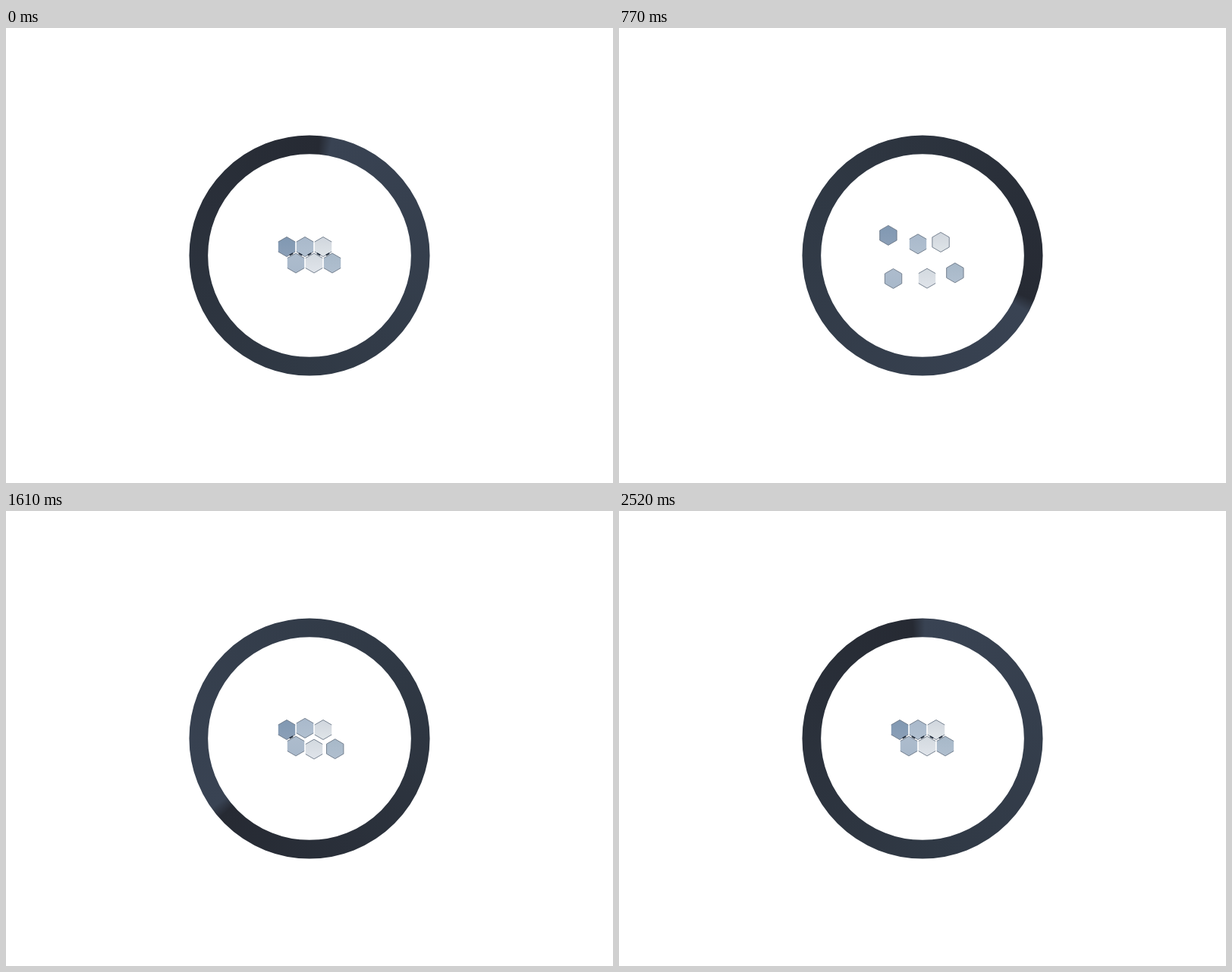
Recreate the animation shown at these times as an HTML page with a canvas. Size 800 px wide and 600 px high, loop 2590 ms.

```html
<!DOCTYPE html>
<html>
<head>
<meta charset="utf-8">
<style>
  html, body { margin: 0; width: 100%; height: 100%; overflow: hidden; background: #fff; }
  canvas { display: block; }
</style>
</head>
<body>
<canvas id="stage" width="800" height="600"></canvas>
<script>
const ctx = document.getElementById('stage').getContext('2d');
const LOOP = 2590, STEP = 70;
const HALF_W = 11.2, RADIUS = 13;

// Rest position, outward direction, travel, delay, top and bottom colour
const hexes = [
  { x: 370, y: 288.5, dx: -1, dy: -1, travel: 25, delay: 565, top: '#8098b2', bottom: '#8b9fb7' },
  { x: 394, y: 288.5, dx: 0, dy: -1, travel: 37, delay: 700, top: '#a9b9cb', bottom: '#b1c0d0' },
  { x: 418, y: 288.5, dx: 1, dy: -1, travel: 19.5, delay: 0, top: '#d0d6dd', bottom: '#dfe4e8' },
  { x: 382, y: 310, dx: -1, dy: 1, travel: 20.5, delay: 420, top: '#adbccd', bottom: '#a8b8ca' },
  { x: 406, y: 310, dx: 0, dy: 1, travel: 22, delay: 280, top: '#d3d9df', bottom: '#e0e4ea' },
  { x: 430, y: 310, dx: 1, dy: 1, travel: 20, delay: 140, top: '#a7b8c8', bottom: '#b0bfcf' }
];

function ease(from, to, t) {
  const x = Math.min(1, Math.max(0, (t - from) / (to - from)));
  return x * x * (3 - 2 * x);
}

// One push outwards and back, then a small rebound
function push(t) {
  return ease(0, 360, t) - ease(380, 1000, t)
    + 0.25 * (ease(1190, 1400, t) - ease(1400, 1610, t));
}

function drawRing(t) {
  const seam = (4.8 + 360 * t / LOOP) * Math.PI / 180;
  const shade = ctx.createConicGradient(seam - Math.PI / 2, 400, 300);
  shade.addColorStop(0, '#262a33');
  shade.addColorStop(0.017, '#394353');
  shade.addColorStop(0.5, '#303945');
  shade.addColorStop(1, '#262a33');
  ctx.strokeStyle = shade;
  ctx.lineWidth = 24.7;
  ctx.beginPath();
  ctx.arc(400, 300, 146.2, 0, Math.PI * 2);
  ctx.stroke();
}

function line(points) {
  ctx.beginPath();
  points.forEach(([x, y]) => ctx.lineTo(x, y));
}

function drawHex(hex, x, y) {
  const h = RADIUS / 2;
  const roof = [[x - HALF_W, y - h], [x, y - RADIUS], [x + HALF_W, y - h]];
  const floor = [[x + HALF_W, y + h], [x, y + RADIUS], [x - HALF_W, y + h]];
  const fill = ctx.createLinearGradient(0, y - RADIUS, 0, y + RADIUS);
  fill.addColorStop(0, hex.top);
  fill.addColorStop(1, hex.bottom);
  ctx.fillStyle = fill;
  line([...roof, ...floor]);
  ctx.fill();
  ctx.strokeStyle = '#6b7887';
  ctx.lineWidth = 0.9;
  if (Math.abs(x - hex.x) > 0.3) {
    ctx.closePath();
    ctx.stroke();
  } else {
    for (const edge of [roof, floor]) {
      line(edge);
      ctx.stroke();
    }
  }
}

// Dark sliver in the gap between two tightly packed rows
function drawGap(a, b) {
  const dx = b.x - a.x, dy = b.y - a.y, dist = Math.hypot(dx, dy);
  if (dy < 10 || dist > 24.9) return;
  const mx = (a.x + b.x) / 2, my = (a.y + b.y) / 2 - 0.8;
  const ux = dy / dist * 2.5, uy = -dx / dist * 2.5;
  ctx.strokeStyle = '#263140';
  ctx.lineWidth = 2;
  line([[mx - ux, my - uy], [mx + ux, my + uy]]);
  ctx.stroke();
}

function draw(now) {
  const t = Math.floor(now % LOOP / STEP) * STEP;
  ctx.clearRect(0, 0, 800, 600);
  drawRing(t);
  const spots = hexes.map(hex => {
    const shift = hex.travel * push(t - hex.delay);
    return { x: hex.x + hex.dx * shift, y: hex.y + hex.dy * shift };
  });
  hexes.forEach((hex, i) => drawHex(hex, spots[i].x, spots[i].y));
  spots.forEach(a => spots.forEach(b => drawGap(a, b)));
}

const start = performance.now();
function tick() {
  draw(performance.now() - start);
  requestAnimationFrame(tick);
}
tick();
</script>
</body>
</html>
```
